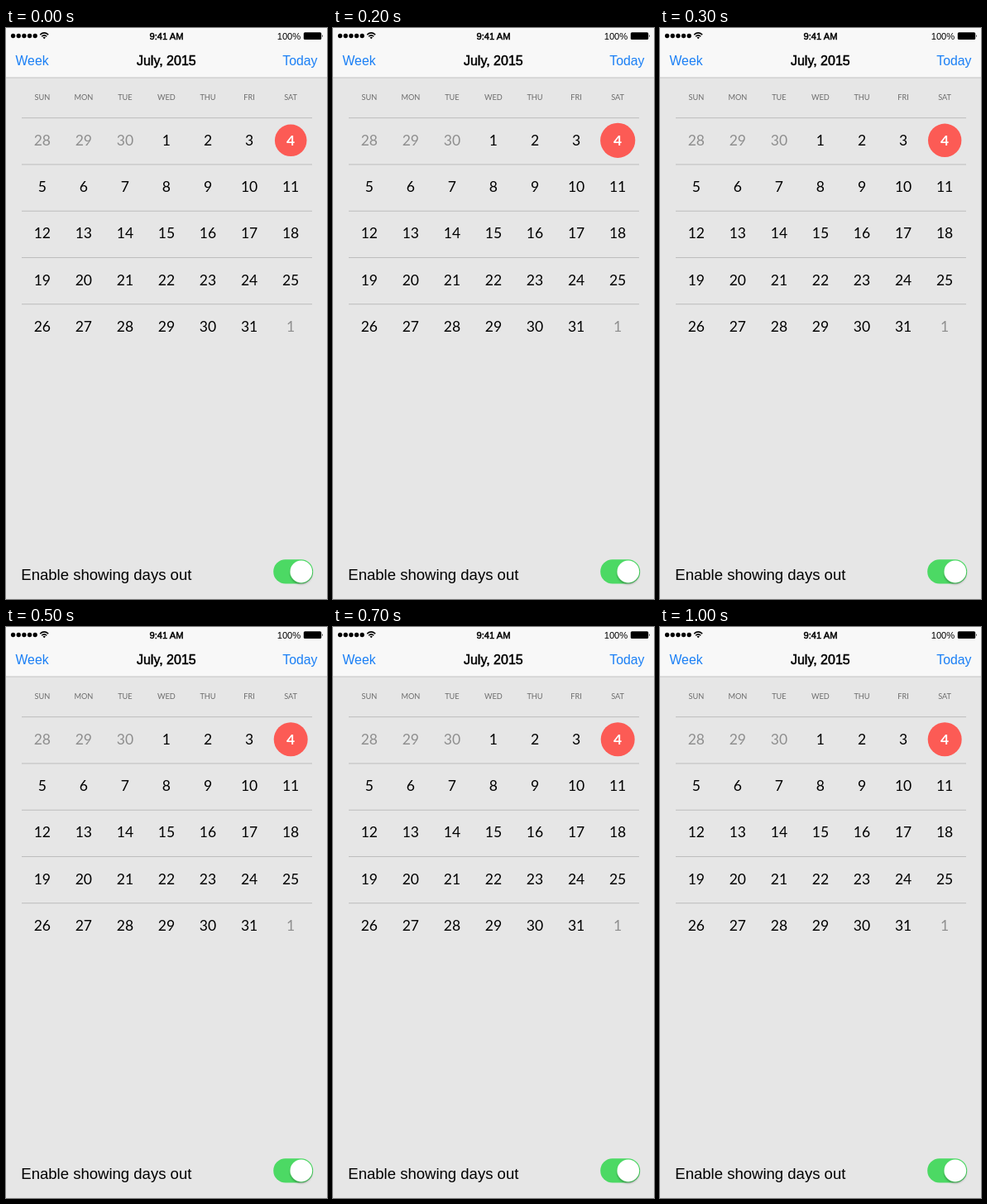
Write an HTML page that moves like this. It is 388 px wide and 690 px high and loops after 8000 ms.

```html
<!DOCTYPE html>
<html lang="en">
<head>
<meta charset="utf-8">
<style>
html, body { margin: 0; width: 100%; height: 100%; overflow: hidden; background: #e6e6e6; }
svg { display: block; font-family: "Liberation Sans", Arial, sans-serif; }
#calendar { font-family: Lato, sans-serif; text-anchor: middle; }
.days { font-size: 17.5px; }
.out { fill: #8e8e8e; }
.today { fill: #fff; font-weight: bold; }
.names { font-size: 9.2px; fill: #6c6c6c; }
.link { font-size: 15.8px; fill: #1a7ff5; }
.medium { stroke: #000; stroke-width: .5px; }
.small { font-size: 11.2px; }
</style>
</head>
<body>
<svg width="388" height="690" viewBox="0 0 388 690">
  <defs>
    <filter id="shadow" x="-30%" y="-30%" width="160%" height="170%">
      <feDropShadow dx="0" dy="2" stdDeviation="1.3" flood-opacity=".3"/>
    </filter>
  </defs>
  <rect width="388" height="690" fill="#e6e6e6"/>
  <rect width="388" height="60" fill="#f8f8f8"/>
  <rect y="59.5" width="388" height="1" fill="#c4c4c4"/>

  <g id="signal"></g>
  <g fill="none" stroke="#000" stroke-width="1.5">
    <path d="M41.2 8.1Q46.2 3.7 51.2 8.1M43.1 10.2Q46.2 7.5 49.3 10.2"/>
    <path d="M44.5 11.5Q46.2 10.1 47.9 11.5L46.2 13.3Z" fill="#000" stroke="none"/>
  </g>
  <text class="small medium" x="194" y="13.6" text-anchor="middle" stroke-width=".3">9:41 AM</text>
  <text class="small" x="356.3" y="13.6" text-anchor="end">100%</text>
  <rect x="359.8" y="5.2" width="21.4" height="8.8" rx="1.6"/>
  <path d="M382 7.9q1.7 1.7 0 3.4z"/>

  <text class="link" x="11.5" y="45.3">Week</text>
  <text class="medium" x="193.8" y="45.3" font-size="16" text-anchor="middle">July, 2015</text>
  <text class="link" x="376.5" y="45.3" text-anchor="end">Today</text>

  <g id="calendar"><circle id="mark" cx="344.2" cy="135.8" fill="#fc5b55"/></g>

  <text x="18.3" y="666.5" font-size="18.55">Enable showing days out</text>
  <rect x="323.2" y="642.3" width="48" height="29.2" rx="14.6" fill="#4cd964"/>
  <circle cx="356.8" cy="656.9" r="13.3" fill="#fff" filter="url(#shadow)"/>
</svg>
<script>
const calendar = document.getElementById("calendar");
const mark = document.getElementById("mark");

function add(parent, tag, attrs, text = "") {
  const node = document.createElementNS("http://www.w3.org/2000/svg", tag);
  for (const key in attrs) node.setAttribute(key, attrs[key]);
  node.textContent = text;
  parent.append(node);
}

const column = i => 43.8 + 50.05 * i;

for (let i = 0; i < 5; i++) {
  add(document.getElementById("signal"), "circle", { cx: 8.6 + 6.65 * i, cy: 9.5, r: 2.65 });
  add(calendar, "rect", { x: 19, y: 108.2 + 56.25 * i, width: 351, height: 1, fill: "#bcbcbc" });
}

["SUN", "MON", "TUE", "WED", "THU", "FRI", "SAT"].forEach((name, i) =>
  add(calendar, "text", { class: "names", x: column(i), y: 87 }, name));

for (let i = 0; i < 35; i++) {
  const day = i - 2;
  const label = day < 1 ? day + 30 : day > 31 ? day - 31 : day;
  const kind = day < 1 || day > 31 ? "out" : day === 4 ? "today" : "";
  add(calendar, "text", {
    class: "days " + kind,
    x: column(i % 7),
    y: 141.8 + 56.25 * Math.floor(i / 7)
  }, label);
}

// The selected day bounces in 100 ms steps, then rests.
const radii = [19.3, 19, 21.1, 20.2, 20.6, 20.5];

function draw(now) {
  const step = Math.floor(now % 8000 / 100);
  mark.setAttribute("r", radii[Math.min(step, radii.length - 1)]);
  requestAnimationFrame(draw);
}
draw(0);
</script>
</body>
</html>
```
